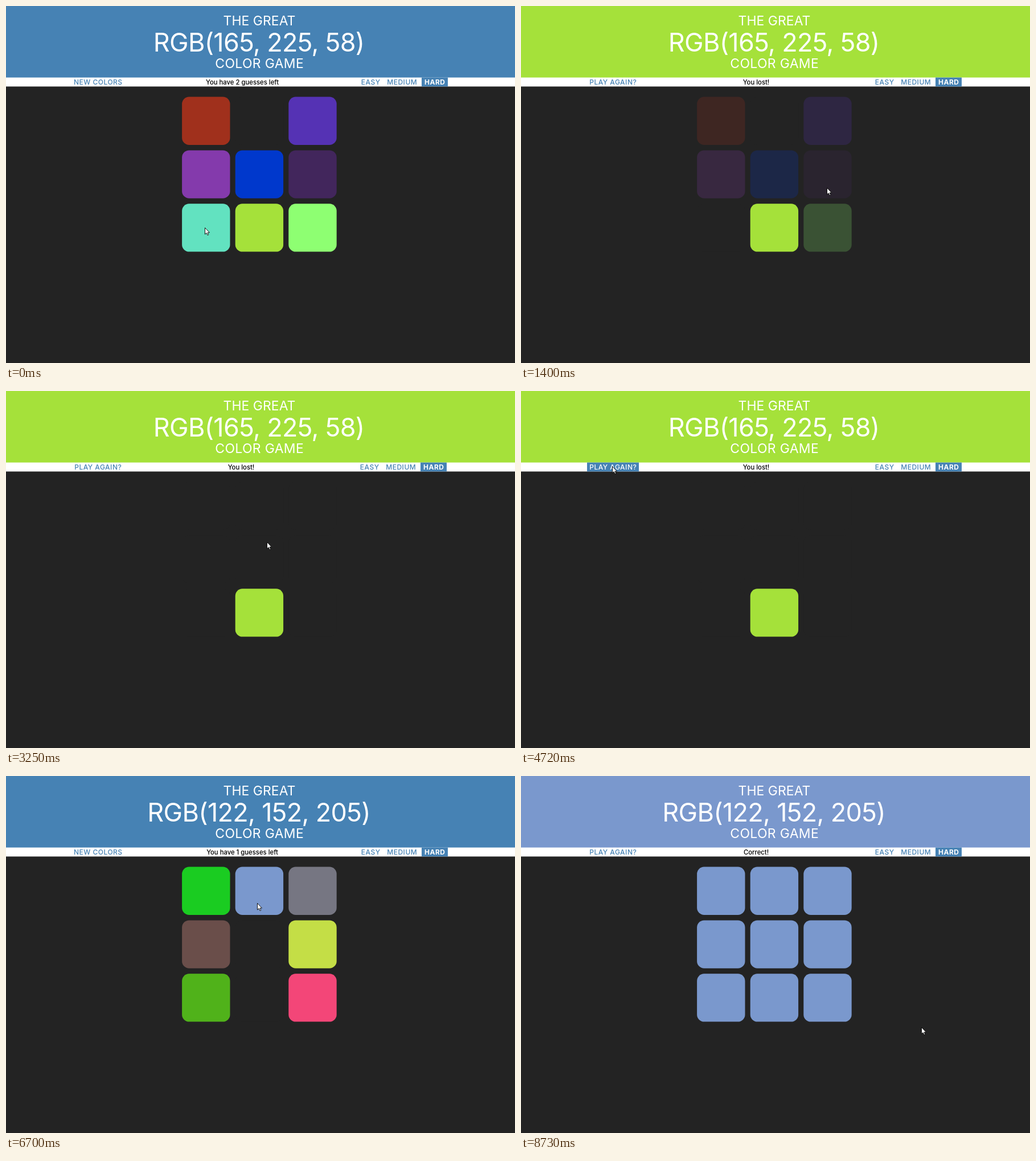
An HTML page with a canvas that plays this animation: 894 by 627 pixels, repeating every 9.61 s.

```html
<!DOCTYPE html>
<html lang="en">
<head>
<meta charset="utf-8">
<title>Color game</title>
<style>
  html, body { margin: 0; width: 100%; height: 100%; overflow: hidden; background: #232323; }
  canvas { display: block; }
</style>
</head>
<body>
<canvas id="stage" width="894" height="627"></canvas>
<script>
const ctx = document.getElementById('stage').getContext('2d');
const LOOP = 9610, FADE = 600, CLICK_DELAY = 60;
const FONT = 'Inter, "Open Sans", sans-serif';
const BLUE = '#4682b4', DARK = [35, 35, 35];
const BAR = { top: 125.6, height: 15.8 };

const parse = hex => hex.match(/../g).map(h => parseInt(h, 16));
const board = (colors, goal) => ({ colors: colors.split(' ').map(parse), goal });
const OLD = board('a0301c 232323 5532b4 843aac 0038cc 42265c 62e2c0 a5e13a 8eff72', 7);
const NEW = board('1acc21 7a98cd 767682 6a4e4a 2e533e c4de46 50b21a d758e8 f34678', 1);

// Where the pointer stops, for how long, and what it clicks there
const STOPS = [
  { at: 120, rest: 200, x: 349, y: 389, pick: 6 },
  { at: 1050, rest: 950, x: 537, y: 319, pick: 5 },
  { at: 2600, rest: 0, x: 751, y: 124 },
  { at: 3230, rest: 470, x: 458, y: 265 },
  { at: 4680, rest: 80, x: 160, y: 132, pick: 'new' },
  { at: 5160, rest: 0, x: 355, y: 280 },
  { at: 5460, rest: 140, x: 440, y: 300, pick: 4 },
  { at: 6000, rest: 260, x: 443, y: 385, pick: 7 },
  { at: 6650, rest: 100, x: 441, y: 223, pick: 1 },
  { at: 7080, rest: 420, x: 381, y: 220 },
  { at: 7800, rest: 0, x: 335, y: 350 },
  { at: 8050, rest: 200, x: 386, y: 400 },
  { at: 8480, rest: 0, x: 545, y: 481 },
  { at: 8730, rest: 880, x: 703, y: 441 }
];

const mix = (a, b, k) => a + (b - a) * k;
const smooth = k => k * k * (3 - 2 * k);
const rgb = c => `rgb(${c.map(Math.round).join(',')})`;

// The CSS "ease" curve
function ease(x) {
  if (x >= 1) return 1;
  const bez = (u, a, b) => 3 * (1 - u) ** 2 * u * a + 3 * (1 - u) * u * u * b + u ** 3;
  let lo = 0, hi = 1;
  for (let n = 0; n < 20; n++) {
    const mid = (lo + hi) / 2;
    if (bez(mid, 0.25, 0.25) < x) lo = mid; else hi = mid;
  }
  return bez(lo, 0.1, 1);
}

function cellColor(cell, t) {
  const k = ease((t - cell.at) / FADE);
  return cell.from.map((v, n) => mix(v, cell.to[n], k));
}

// Replays every click up to time t
function play(t) {
  const game = { board: OLD, left: 2, over: null };
  game.cells = OLD.colors.map(c => ({ from: c, to: c, at: -FADE }));
  const fade = (i, to, at) => {
    game.cells[i] = { from: cellColor(game.cells[i], at), to, at };
  };
  for (const { at, pick } of STOPS) {
    const now = at + CLICK_DELAY;
    if (pick === undefined || now > t) continue;
    if (pick === 'new') {
      Object.assign(game, { board: NEW, left: 3, over: null });
      NEW.colors.forEach((c, i) => fade(i, c, now));
      continue;
    }
    const { colors, goal } = game.board;
    if (pick === goal) {
      game.over = 'Correct!';
      colors.forEach((c, i) => fade(i, colors[goal], now));
    } else if (--game.left > 0) {
      fade(pick, DARK, now);
    } else {
      game.over = 'You lost!';
      colors.forEach((c, i) => i !== goal && fade(i, DARK, now));
    }
  }
  return game;
}

function pointer(t) {
  const n = STOPS.findIndex(s => s.at > t);
  if (n === 0) return STOPS[0];
  const a = STOPS[n < 0 ? STOPS.length - 1 : n - 1], b = STOPS[n] || a;
  const leave = a.at + a.rest;
  const k = t <= leave ? 0 : smooth((t - leave) / (b.at - leave));
  return { x: Math.round(mix(a.x, b.x, k)), y: Math.round(mix(a.y, b.y, k)) };
}

function rect(x, y, w, h, fill) {
  ctx.fillStyle = fill;
  ctx.fillRect(x, y, w, h);
}

function label(text, x, y, size, weight, spacing, fill) {
  ctx.font = `${weight} ${size}px ${FONT}`;
  ctx.letterSpacing = spacing + 'px';
  ctx.fillStyle = fill;
  ctx.fillText(text, x + spacing / 2, y);
}

function button(text, center, half, mouse, chosen) {
  const hover = Math.abs(mouse.x - center) < half && mouse.y >= 126 && mouse.y < 141;
  const lit = chosen || hover;
  if (lit) rect(center - half, BAR.top, half * 2, BAR.height, BLUE);
  label(text, center, 138, 12, chosen ? 700 : 500, 0.5, lit ? '#fff' : BLUE);
}

function arrow({ x, y }) {
  ctx.save();
  ctx.translate(x, y);
  const shape = new Path2D('M.5 .5V12L3.1 9.6 5 13.6 6.8 12.8 5 9H8.5Z');
  ctx.fillStyle = '#fff';
  ctx.fill(shape);
  ctx.strokeStyle = '#000';
  ctx.lineWidth = 0.9;
  ctx.stroke(shape);
  ctx.restore();
}

function draw(t) {
  const { board, left, over, cells } = play(t);
  const mouse = pointer(t);
  const goal = board.colors[board.goal];
  const shift = over ? 2 : 0;

  rect(0, 0, 894, 627, rgb(DARK));
  rect(0, 0, 894, 127, over ? rgb(goal) : BLUE);
  rect(0, BAR.top, 894, BAR.height, '#fff');

  ctx.textAlign = 'center';
  label('THE GREAT', 445, 34, 23, 400, 0, '#fff');
  label(`RGB(${goal.join(', ')})`, 444.5, 80, 45, 400, -0.7, '#fff');
  label('COLOR GAME', 445, 108.5, 23, 400, 0.3, '#fff');

  button(over ? 'PLAY AGAIN?' : 'NEW COLORS', 161.5, 47.5 - shift, mouse);
  label(over || `You have ${left} guesses left`, 415 - shift, 138, 11.3, 500, 0, '#000');
  button('EASY', 640.5 - shift, 20, mouse);
  button('MEDIUM', 695.5 - shift, 31, mouse);
  button('HARD', 753 - shift, 23, mouse, true);

  cells.forEach((cell, i) => {
    ctx.beginPath();
    ctx.roundRect(309.1 + (i % 3) * 93.6, 159.6 + Math.floor(i / 3) * 93.8, 84.4, 84.4, 12.6);
    ctx.fillStyle = rgb(cellColor(cell, t));
    ctx.fill();
  });
  arrow(mouse);
}

const begin = performance.now();
function tick() {
  draw((performance.now() - begin) % LOOP);
  requestAnimationFrame(tick);
}
tick();
</script>
</body>
</html>
```
